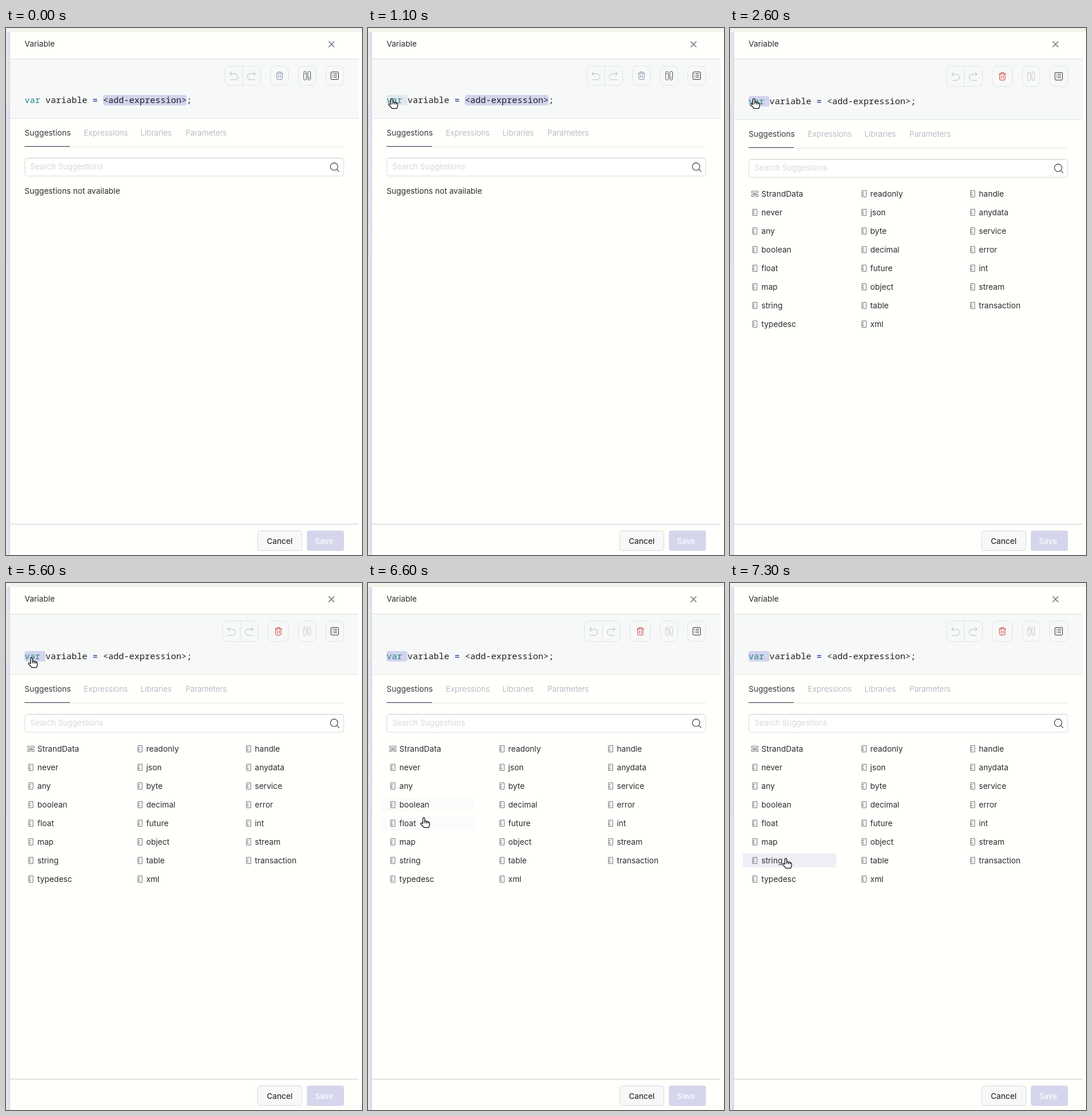
Recreate the animation shown at these times as an HTML page with a canvas. Size 613 by 906 pixels, loop 8000 ms.

```html
<!DOCTYPE html>
<html lang="en">
<head>
<meta charset="utf-8">
<title>Variable editor</title>
<style>
html, body { margin: 0; width: 100%; height: 100%; overflow: hidden; background: #fffffc; }
canvas { display: block; }
</style>
</head>
<body>
<canvas id="stage" width="613" height="906"></canvas>
<script>
const ctx = document.getElementById('stage').getContext('2d');
const LOOP = 8000, SELECTED = 1900, LISTED = 2600;
const UI = 'Inter, "Open Sans", sans-serif';
const MONO = '"Noto Sans Mono", "DejaVu Sans Mono", monospace';
const REGULAR = `400 13.6px ${UI}`, LIGHT = `300 13.5px ${UI}`, MEDIUM = `500 13.4px ${UI}`;
const INK = '#2c2c2e', MUTED = '#a9a9b6', BORDER = '#e0e3e7', TOKEN = '#d2d4ee';

const types = ['StrandData', 'readonly', 'handle', 'never', 'json', 'anydata',
  'any', 'byte', 'service', 'boolean', 'decimal', 'error', 'float', 'future', 'int',
  'map', 'object', 'stream', 'string', 'table', 'transaction', 'typedesc', 'xml'];
const columns = [37, 225, 412];

// Pointer poses: start time, hotspot x, hotspot y, shape
const pointer = [
  [500, 45, 37, 'arrow'], [700, 45, 57, 'arrow'], [800, 44, 92, 'arrow'],
  [900, 43, 122, 'hand'], [1000, 42, 122, 'hand'], [1100, 41, 121, 'hand'],
  [5600, 44, 128, 'hand'], [5700, 49, 137, 'hand'], [5800, 61, 160, 'arrow'],
  [5900, 80, 193, 'hand'], [6000, 99, 232, 'beam'], [6100, 113, 268, 'arrow'],
  [6200, 117, 305, 'hand'], [6300, 112, 339, 'hand'], [6400, 104, 364, 'hand'],
  [6500, 99, 385, 'hand'], [6600, 96, 403, 'hand'], [6700, 95, 421, 'hand'],
  [6800, 95, 438, 'hand'], [6900, 95, 452, 'hand'], [7000, 95, 462, 'hand'],
  [7100, 95, 468, 'hand'], [7200, 95, 471, 'hand'], [7300, 96, 473, 'hand']
];

// Row hover: row, enter time, leave time
const hovers = [[2, 6350, 6400], [3, 6500, 6570], [4, 6560, 6700], [5, 6720, 6840], [6, 6900, LOOP]];

function rect(x, y, w, h, color) {
  ctx.fillStyle = color;
  ctx.fillRect(x, y, w, h);
}

function box(x, y, w, h, r, fill, stroke) {
  ctx.beginPath();
  ctx.roundRect(x, y, w, h, r);
  if (fill) { ctx.fillStyle = fill; ctx.fill(); }
  if (stroke) { ctx.strokeStyle = stroke; ctx.lineWidth = 1; ctx.stroke(); }
}

function text(str, x, y, color = INK, font = REGULAR) {
  ctx.font = font;
  ctx.fillStyle = color;
  ctx.fillText(str, x, y);
}

function draw(d, x, y, color, width = 1, fill) {
  const path = new Path2D(d);
  ctx.save();
  ctx.translate(x, y);
  ctx.lineCap = ctx.lineJoin = 'round';
  if (fill) { ctx.fillStyle = fill; ctx.fill(path); }
  ctx.strokeStyle = color;
  ctx.lineWidth = width;
  ctx.stroke(path);
  ctx.restore();
}

function backdrop() {
  rect(0, 0, 613, 906, '#fffffc');
  rect(0, 0, 613, 7, '#f3f3ee');
  rect(0, 7, 7, 899, '#e6e6ef');
  rect(0, 43, 7, 90, '#e7e9ea');
  rect(0, 42, 7, 1, '#dcdce5');
  rect(0, 397, 7, 1, '#dadae5');
  for (let y = 135; y < 396; y += 5) rect(0, y, 1, 2, '#c8c8da');
  const shade = ctx.createLinearGradient(2, 0, 7, 0);
  shade.addColorStop(0, 'rgba(90,90,120,0)');
  shade.addColorStop(1, 'rgba(90,90,120,.1)');
  rect(2, 7, 5, 899, shade);
}

function header() {
  text('Variable', 32, 32);
  draw('M-4.5-4.5L4.5 4.5M4.5-4.5L-4.5 4.5', 560.5, 28, '#737380', 1.5);
}

function toolbar(selected) {
  const dx = selected ? -4 : 0, h = selected ? 35 : 33, cy = selected ? 83 : 82;
  const undo = 'M-3-8L-6.5-4.5L-3-1M-6.5-4.5H2A5.2 5.2 0 0 1 2 6H-5.5';
  const redo = 'M3-8L6.5-4.5L3-1M6.5-4.5H-2A5.2 5.2 0 0 0-2 6H5.5';
  box(376.5 + dx, 65.5, 62, h, 8, null, BORDER);
  rect(407 + dx, 66, 1, h, BORDER);
  draw(undo, 392 + dx, cy + 1, '#b7bac3');
  draw(redo, 423 + dx, cy + 1, '#b7bac3');

  box(455.5 + dx, 65.5, selected ? 35 : 31, h, 8, null, BORDER);
  draw('M-6-4H6M-2.5-4V-6.5H2.5V-4M-4.5-4V5Q-4.5 6.5-3 6.5H3Q4.5 6.5 4.5 5V-4M-1.5-1V3.5M1.5-1V3.5',
    selected ? 469 : 471, cy, selected ? '#c9423b' : '#8d91a3');

  box(503.5, 65.5, 30, h, 8, null, BORDER);
  const pill = 'M-6-5Q-6-7.5-3.6-7.5Q-1.2-7.5-1.2-5V5Q-1.2 7.5-3.6 7.5Q-6 7.5-6 5Z'
    + 'M1.2-5Q1.2-7.5 3.6-7.5Q6-7.5 6-5V5Q6 7.5 3.6 7.5Q1.2 7.5 1.2 5ZM-3.6-4.5V-2.5M3.6 2.5V4.5';
  draw(pill, 518.5, cy, selected ? '#c3c5cc' : '#55585f');

  box(550.5, 65.5, 31, h, 8, null, BORDER);
  draw('M-5-6.5H5Q6.5-6.5 6.5-5V5Q6.5 6.5 5 6.5H-5Q-6.5 6.5-6.5 5V-5Q-6.5-6.5-5-6.5Z'
    + 'M-3.7-3.5H-3.2M-1.2-3.5H3.7M-3.7-.5H-3.2M-1.2-.5H3.7M-3.7 2.5H-3.2M-1.2 2.5H3.7', 566, cy, '#34363c');
}

function statement(t, selected) {
  const y = selected ? 131 : 129, top = y - 14;
  if (selected) {
    box(32, top, 36, 18, 4, TOKEN);
  } else {
    box(167, top, 144, 18, 4, TOKEN);
    if (t >= 900) {
      ctx.globalAlpha = Math.min(1, (Math.floor(t / 100) - 8) / 3);
      box(32, top, 36, 18, 4, '#e2e8ec');
      ctx.globalAlpha = 1;
    }
  }
  const font = `400 15px ${MONO}`;
  text('var', 32, y, '#2a8587', font);
  text('variable', 68, y, '#1f1f21', font);
  text('=', 149, y, '#16128c', font);
  text('<add-expression>;', 167, y, '#1f1f21', font);
}

function tabsAndSearch() {
  text('Suggestions', 32, 185, '#3a3a42');
  text('Expressions', 134, 185, MUTED, LIGHT);
  text('Libraries', 231.5, 185, MUTED, LIGHT);
  text('Parameters', 309, 185, MUTED, LIGHT);
  rect(32, 204, 550, 1, '#e5e7ea');
  rect(32, 203, 78, 1, '#40404b');
  box(32.5, 223.5, 549, 31, 4, '#fffffd', '#d9dbe2');
  rect(35, 224, 544, 1, '#e8e9ed');
  text('Search Suggestions', 42, 243, '#cdcdd8', LIGHT);
  draw('M6.4 0A6.4 6.4 0 1 1-6.4 0A6.4 6.4 0 1 1 6.4 0M4.6 4.6L8.5 8.5', 565, 238.3, '#3c3c44', 1.1);
}

function hoverAlpha(t, enter, leave) {
  const rise = Math.min(1, Math.max(0, (Math.min(t, leave) - enter) / 200));
  return t < leave ? rise : Math.max(0, rise - (t - leave) / 500);
}

function typeList(t) {
  const step = Math.floor(t / 100) * 100;
  for (const [row, enter, leave] of hovers) {
    ctx.globalAlpha = hoverAlpha(step, enter, leave);
    rect(22, 273 + row * 32, 161, 24, '#efeff8');
  }
  ctx.globalAlpha = 1;
  types.forEach((name, i) => {
    const x = columns[i % 3], y = 285 + Math.floor(i / 3) * 32;
    if (i === 0) {
      draw('M.5-4.5H11.5V-1.5H.5ZM6-1.5V1M2.5 1H9.5M.5 1.5H4.5V4.5H.5ZM7.5 1.5H11.5V4.5H7.5Z', x, y, '#777980');
    } else {
      draw('M2.5-5.5H9.5V5.5H2.5ZM2.5-2.5H5.5M2.5 .5H4.5M2.5 2.5H5.5', x, y, '#777980');
    }
    text(name, x + (i % 3 ? 16.5 : 17), y + 5);
  });
}

function footer() {
  rect(7, 852, 600, 2, '#e1e4e6');
  box(433.5, 864.5, 76, 34, 4, '#f7f8f8', '#d8dae1');
  box(518, 864, 64, 35, 4, '#d5d6eb');
  text('Cancel', 449, 887, '#34343c', MEDIUM);
  text('Save', 532, 887, '#fbfbff', MEDIUM);
}

function cursor(t) {
  const pose = pointer.findLast(p => p[0] <= t);
  if (!pose) return;
  const [, x, y, shape] = pose;
  if (shape === 'arrow') {
    draw('M0 0V15.5L3.6 12.2L6 17.8L8.6 16.7L6.2 11.2H11.2Z', x + .5, y + .5, '#151515', 1, '#fff');
  } else if (shape === 'beam') {
    draw('M-3-8H3M0-8V8M-3 8H3', x, y, '#151515', 1.2);
  } else {
    draw('M-2 10V1.6Q-2 0-.5 0Q1.2 0 1.2 1.6V6.2Q1.8 5.2 3 5.5Q4 5.8 4.1 6.8Q5 5.8 6.2 6.4'
      + 'Q6.8 6.8 6.9 7.7Q9.3 7 9.5 9V12Q9.5 14 8 16.8H-.3Q-1.4 14.8-5.3 11.3Q-6.5 9.8-5.2 9Q-4 8.3-2 10Z'
      + 'M1.2 6.2V9M4.1 6.8V9.3M6.9 7.7V9.5', x + .5, y + .5, '#151515', 1.3, '#fff');
  }
}

function render(t) {
  const selected = t >= SELECTED, shift = selected ? 2 : 0;
  backdrop();
  header();
  rect(7, 53, 600, 103 + shift, '#f7f9f9');
  rect(7, 53, 600, 1, '#d9dddf');
  rect(7, 155 + shift, 600, 1, '#e1e5e7');
  toolbar(selected);
  statement(t, selected);
  ctx.save();
  ctx.translate(0, shift);
  tabsAndSearch();
  if (t < LISTED) text('Suggestions not available', 32, 285);
  ctx.restore();
  if (t >= LISTED) typeList(t);
  footer();
  cursor(t);
}

const start = performance.now();
function tick() {
  render((performance.now() - start) % LOOP);
  requestAnimationFrame(tick);
}
tick();
</script>
</body>
</html>
```
